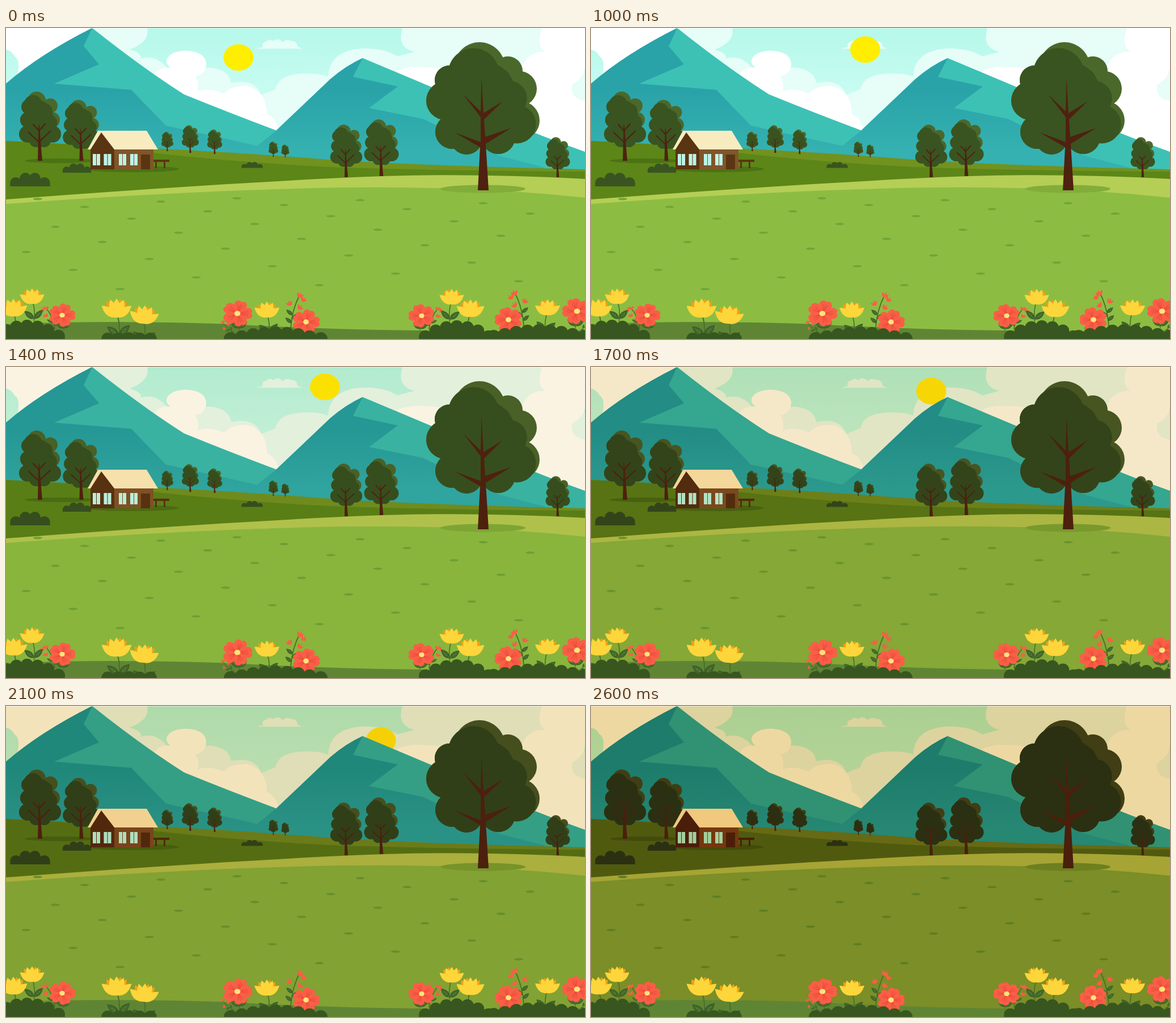
These frames come from a looping animation (1021x548 px, 2.7 s). An HTML page:

```html
<!DOCTYPE html>
<html lang="en">
<head>
<meta charset="utf-8">
<title>Meadow sunset</title>
<style>
  html, body { margin: 0; width: 100%; height: 100%; overflow: hidden; }
  svg { display: block; width: 100%; height: 100%; }
  .line { fill: none; stroke-linecap: round; }
  .twig { fill: none; stroke: var(--wood); stroke-width: 2.2; stroke-linecap: round; }
  .stem { fill: none; stroke: #48702c; stroke-width: 1.8; stroke-linecap: round; }
</style>
<style id="fills"></style>
</head>
<body>
<svg viewBox="0 0 1021 548" preserveAspectRatio="none">
  <defs>
    <linearGradient id="skyFade" x2="0" y2="120" gradientUnits="userSpaceOnUse">
      <stop class="sky"/><stop class="skyLow" offset="1"/>
    </linearGradient>
    <linearGradient id="slopeFade" x1="0" y1="110" x2="0" y2="215" gradientUnits="userSpaceOnUse">
      <stop class="slope"/><stop class="slopeLow" offset="1"/>
    </linearGradient>

    <g id="tree">
      <g id="smallCanopy"></g>
      <path class="wood" d="M-4 0L-2.5-64H-1.5L4 0Z"/>
      <path class="twig" d="M-1-32L-20-50M0-35L18-52M-1-52L-12-64M-1-54L9-65"/>
    </g>
    <g id="blade">
      <path fill="#3c6128" d="M0 0Q-11-10 0-25Q11-10 0 0Z"/>
      <path class="line" stroke="#64873e" stroke-width=".8" d="M0-2V-20M-3-12L0-8L3-12M-2-16L0-13L2-16"/>
    </g>
    <path id="tulipPetal" d="M0 0Q-13-13 0-31Q13-13 0 0Z"/>
    <g id="petal">
      <path fill="#fb5e46" d="M0 0Q-15-14-9-22Q-5-27 0-23Q5-27 9-22Q15-14 0 0Z"/>
      <path class="line" stroke="#df4637" stroke-width=".9" d="M0-6V-18M-1-6L-4-17M1-6L4-17"/>
    </g>
    <path id="bud" fill="#fb5e46" d="M0 0Q-8-3-6-11L-1-7L1-13L3-7L7-9Q7-2 0 0Z"/>
    <g id="tulip"></g>
    <g id="blossom"></g>
    <g id="sprig"></g>
    <g id="leaves"></g>

    <g id="mixedBed">
      <use href="#sprig" transform="translate(86 530) scale(-1 .62)"/>
      <use href="#tulip" transform="translate(46 486) scale(.88)"/>
      <use href="#tulip" transform="translate(13 508)"/>
      <use href="#blossom" transform="translate(99 506) scale(.94 .82)"/>
      <path id="mixedMound" fill="#38561f"/>
    </g>
    <g id="redBed">
      <use href="#sprig" transform="translate(405 538) rotate(-65) scale(.5)"/>
      <use href="#sprig" transform="translate(502 530)"/>
      <use href="#tulip" transform="translate(460 510) scale(.9)"/>
      <use href="#blossom" transform="translate(408 503) scale(1.06 .92)"/>
      <use href="#blossom" transform="translate(529 518) scale(.98 .88)"/>
      <path id="redMound" fill="#38561f"/>
    </g>
  </defs>

  <rect width="1021" height="548" fill="url(#skyFade)"/>
  <g class="haze">
    <path d="M140 0H249Q255 24 218 38Q240 44 238 54Q264 46 284 70L330 130H200Z"/>
    <path d="M330 80Q348 66 368 71Q394 76 397 97Q440 88 450 118L475 108Q480 80 530 80Q556 80 568 86Q570 38 632 36Q668 36 690 50L720 42Q688 34 699 0H960L1021 80V190H470L340 130Z"/>
    <path d="M441 36.500Q447 34 453 34Q450 25 459 24Q464 18 471 23Q480 16 488 25Q494 18 503 23Q513 22 514 33Q520 35 522 36.500Z"/>
  </g>
  <g class="puff">
    <path d="M0 0H150L20 84Q26 56 15 50Q10 40 0 38Z"/>
    <path d="M255 100Q262 66 290 70Q280 62 284 54Q292 40 318 40Q353 42 353 64Q352 82 334 85Q342 98 338 112Q358 104 385 116Q394 102 424 102Q460 110 460 152Q478 158 482 186L300 150Z"/>
    <path d="M689 76Q712 66 735 69Q768 68 785 80L810 150H740Z"/>
    <path d="M945 0Q934 34 952 42Q908 40 905 95L850 150L1021 230V128Q995 125 998 100Q1020 88 1021 70V0Z"/>
  </g>

  <ellipse id="sun" class="sun" rx="26.500" ry="23.500"/>

  <path class="peak" d="M0 98Q60 46 152 0Q240 70 314 117Q390 148 478 181V260H0Z"/>
  <path fill="url(#slopeFade)" d="M0 98Q60 46 152 0L137 32L164 64L85 98L221 109L282 172L445 208V260H0Z"/>
  <path class="peak" d="M629 53L760 108Q890 172 1021 218V270H440V210L475 182L572 90Q600 66 629 53Z"/>
  <path fill="url(#slopeFade)" d="M629 53L612 86L691 103L640 141L735 160L870 225L950 246V270H440V210L475 182L572 90Q600 66 629 53Z"/>

  <path class="far" d="M0 199Q150 206 260 212Q420 220 570 232Q740 243 1021 249V300H0Z"/>
  <path class="hill" d="M0 199Q130 204 260 220Q400 236 570 245Q740 251 1021 253V310H0Z"/>
  <ellipse class="shade" cx="95" cy="234" rx="62" ry="4"/>
  <ellipse class="shade" cx="222" cy="248.500" rx="83" ry="5.500"/>
  <g id="trees"></g>
  <path id="bushes" class="leaf"/>

  <path class="wall" d="M188 210H260V249H188Z"/>
  <path class="gable" d="M168 182L191 212V249H149V212ZM238 223H254V249H238ZM260 232H288V236H281V247H278V236H266V247H263V236H260Z"/>
  <path class="roof" d="M162 181H248L268 214H191L168 184L149 214H144Z"/>
  <path id="windows" class="pane"/>

  <path class="band" d="M0 302Q330 277 570 265Q790 253 1021 266V320H0Z"/>
  <path class="grass" d="M0 310Q340 285 600 281Q820 278 1021 299V548H0Z"/>
  <g id="tufts" class="tuft"></g>
  <ellipse class="treeShade" cx="841" cy="283.500" rx="75" ry="7"/>
  <g id="bigCanopy"></g>
  <path class="wood" d="M832 286L836 210L791 184L837 201V157L806 117L837 147L838.500 88L842 150L876 129L843 161L845 192L891 176L846 204L851 286Z"/>

  <path fill="#5f8534" d="M0 522Q180 514 400 522Q620 536 1021 534V548H0Z"/>
  <use href="#mixedBed"/>
  <use href="#mixedBed" transform="translate(832 1) scale(-1 1)"/>
  <use href="#redBed"/>
  <use href="#redBed" transform="translate(1415 -4) scale(-1 1)"/>
  <path fill="#38561f" d="M850 544H1021V548H850Z"/>
  <use href="#tulip" transform="translate(195 510) scale(1.08)"/>
  <use href="#tulip" transform="translate(242 521) rotate(6) scale(1.05)"/>
  <path id="yellowMound" fill="#38561f"/>
  <rect width="1021" height="1" fill="#fff" opacity=".5"/>
</svg>

<script>
const byId = id => document.getElementById(id);
const fill = (id, markup) => byId(id).insertAdjacentHTML('beforeend', markup);
const repeat = (n, make) => Array.from({ length: n }, (_, i) => make(i)).join('');
const use = (shape, x, y, turn = 0, size = 1, extra = '') =>
  `<use href="#${shape}" transform="translate(${x} ${y}) rotate(${turn}) scale(${size})" ${extra}/>`;

// Lobes facing the light slide down and left in the dark layer, leaving a lit rim.
function canopy(id, cx, cy, rx, ry, lobes) {
  const layer = (name, slide) => `<g class="${name}"><ellipse cx="${cx}" cy="${cy}" rx="${rx}" ry="${ry}"/>` +
    lobes.map(([x, y, r]) => {
      const shift = slide * Math.max(0, x - cx - (y - cy));
      return `<circle cx="${x - shift}" cy="${y + shift}" r="${r}"/>`;
    }).join('') + '</g>';
  fill(id, layer('leafLit', 0) + layer('leaf', .2));
}

const smallLobes = [[-6, -106, 16]];
for (const side of [-1, 1]) {
  for (let i = 0; i < 3; i++) smallLobes.push([side * (22 - i * i), -47 - 25 * i, 15 - i]);
  smallLobes.push([side * 7, -36, 12]);
}
canopy('smallCanopy', -1, -70, 25, 36, smallLobes);
canopy('bigCanopy', 840, 128, 62, 70, [
  [835, 70, 45], [885, 76, 26], [905, 107, 31], [907, 163, 34], [868, 192, 30],
  [812, 195, 28], [787, 183, 30], [775, 128, 34], [782, 92, 26]]);

fill('trees', [
  [60, 234, 1], [133, 234, .88], [284.5, 217, .28], [325, 220, .4], [368, 222, .355], [471.5, 227, .22],
  [492.5, 228, .185], [600, 263, .76], [662, 261, .82], [973, 263, .58],
].map(([x, y, size]) => use('tree', x, y, 0, size)).join(''));

// A row of round-topped columns under a sine arch
function mound(left, right, base, height) {
  const count = Math.max(4, Math.round((right - left) / 20));
  const pitch = (right - left) / count;
  const r = pitch * .6;
  return repeat(count, i => {
    const x = left + pitch * (i + .5);
    const y = Math.min(base, base - height * Math.sin(Math.PI * (i + .7) / (count + .4)) ** .6 + r);
    return `M${x - r} ${base}V${y}A${r} ${r} 0 0 1 ${x + r} ${y}V${base}Z`;
  });
}
byId('bushes').setAttribute('d', mound(9, 76, 279, 25) + mound(101, 149, 255, 17) + mound(416, 452, 246.5, 11));
byId('mixedMound').setAttribute('d', mound(-28, 102, 548, 34));
byId('redMound').setAttribute('d', mound(386, 565, 548, 22));
byId('yellowMound').setAttribute('d', mound(170, 264, 548, 12));

byId('windows').setAttribute('d', [153, 172.5, 199, 219].map(x => `M${x} 222h6v20h-6zm7 0h6v20h-6z`).join(''));

// Golden-ratio scatter, denser towards the horizon
fill('tufts', repeat(33, i => {
  const x = 30 + 920 * ((i * .618 + .41) % 1);
  return `<ellipse cx="${x}" cy="${300 + 160 * (i / 32) ** 1.4}" rx="8" ry="2"/>`;
}));

fill('leaves', '<path class="stem" d="M0 0Q7 20 4 42"/>' + use('blade', 4, 38, -52) + use('blade', 4, 38, 45));
const fan = (turns, colour) => turns.map(turn => use('tulipPetal', 0, 0, turn, 1, `fill="${colour}"`)).join('');
fill('tulip', use('leaves', 0, -8) + fan([-32, 12, 32], '#f59f16') + fan([-52, 52, -20, 22, 0], '#fdd63b'));
fill('blossom', use('leaves', 0, 0, 0, .75) + repeat(5, i => use('petal', 0, 0, 18 + 72 * i)) +
  '<circle r="5" fill="#ffe37b"/>');
fill('sprig', '<path class="stem" d="M0 0Q2-32 15-58"/>' + use('bud', 15, -54, 15, .9) + repeat(6, i => {
  const side = i % 2 ? 1 : -1;
  const x = 2 + i * i * .4, y = -10 - i * 7;
  return i < 3 ? use('blade', x, y, side * 50, .6) : use('bud', x + side * 8, y - 3, side * 35, .8);
}));

// Daylight colour, dusk colour
const skyColours = {
  sky: ['b5f8ea', 'abcf92'], skyLow: ['c9fcf2', 'b4d397'], haze: ['e6fdf8', 'ddd39f'],
  puff: ['ffffff', 'eed8a2'], sun: ['ffee00', 'f2c508'], peak: ['3dc1b5', '309273'],
  slope: ['29a3a8', '1d7c6b'], slopeLow: ['35b1b1', '268773'], roof: ['f9ebc0', 'f0c87e'],
  band: ['b5ce55', 'a6a434'],
};
const landColours = {
  far: ['71921f', '666a14'], hill: ['5c8617', '505a0f'], shade: ['4b7213', '434b0c'],
  grass: ['8cbd42', '7b8e27'], tuft: ['6fa637', '5e7d22'], treeShade: ['82ad38', '6e7f20'],
  leaf: ['395420', '2b3012'], leafLit: ['4b682b', '413d14'], wood: ['4f2110', '4a1f0c'],
  wall: ['80552a', '74370f'], gable: ['5a3512', '4a1e08'], pane: ['bdf3e6', 'a5cf9e'],
};
byId('fills').textContent = Object.keys({ ...skyColours, ...landColours })
  .map(name => `.${name}{fill:var(--${name});stop-color:var(--${name})}`).join('');

const channels = hex => [0, 2, 4].map(i => parseInt(hex.slice(i, i + 2), 16));
const lerp = (a, b, k) => a + (b - a) * k;

function tint(colours, dusk) {
  for (const [name, [day, night]] of Object.entries(colours)) {
    const end = channels(night);
    const rgb = channels(day).map((c, i) => Math.round(lerp(c, end[i], dusk)));
    document.documentElement.style.setProperty('--' + name, `rgb(${rgb})`);
  }
}

// Time, sun x, sun y, dusk on sky, dusk on land
const keys = [
  [0, 410, 52, 0, 0], [1000, 483.5, 38, 0, 0], [1400, 562.5, 35, .31, .18], [1700, 600, 42.5, .58, .44],
  [2100, 661, 61, .73, .57], [2300, 686, 82, .78, .86], [2600, 716, 130, 1, 1]];

function draw(now) {
  const time = now % 2700;
  const step = time < 1000 ? 200 : 100;
  const t = Math.floor(time / step) * step;
  const next = Math.max(1, keys.findIndex(key => key[0] >= t));
  const [a, b] = [keys[next - 1], keys[next]];
  const [, x, y, skyDusk, landDusk] = a.map((v, i) => lerp(v, b[i], (t - a[0]) / (b[0] - a[0])));
  byId('sun').setAttribute('transform', `translate(${x} ${y})`);
  tint(skyColours, skyDusk);
  tint(landColours, landDusk);
}

const start = performance.now();
function tick() {
  draw(performance.now() - start);
  requestAnimationFrame(tick);
}
tick();
</script>
</body>
</html>
```
